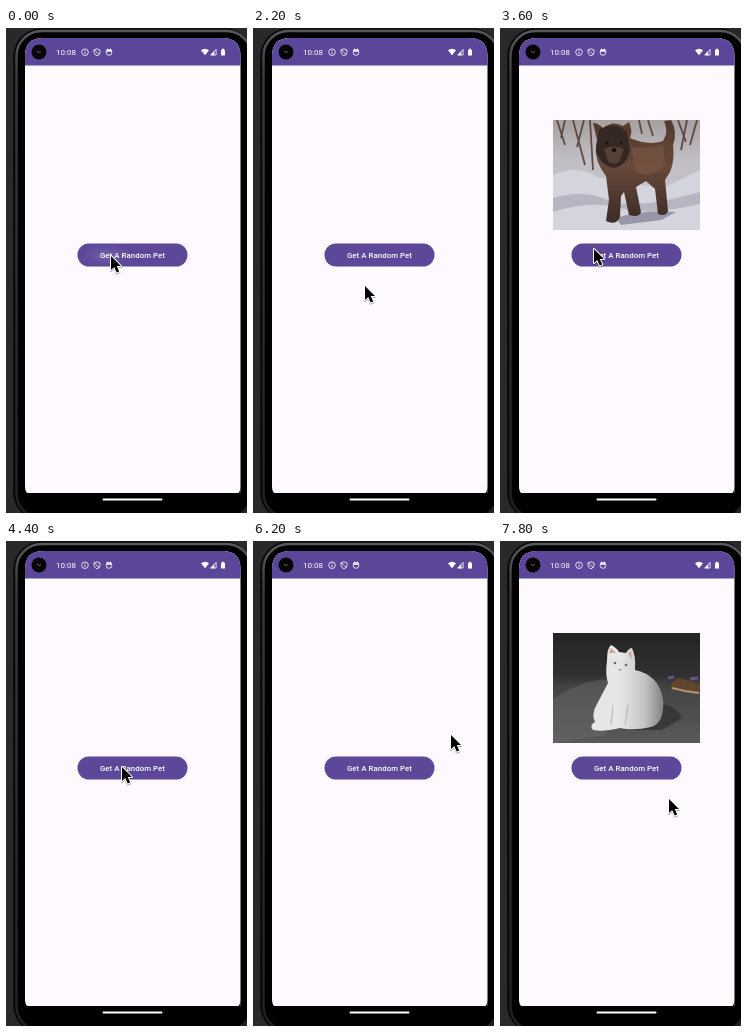
Recreate the animation shown at these times as an HTML page. Size 241x485 px, loop 8 s.

```html
<!DOCTYPE html>
<html lang="en">
<head>
<meta charset="utf-8">
<title>Random pet</title>
<style>
html, body { margin: 0; width: 100%; height: 100%; overflow: hidden; background: #29292b; }
svg { display: block; width: 100%; height: 100%; }
text { font: 500 7.8px Roboto, sans-serif; fill: #fff; }
.clock { font-weight: 400; font-size: 8px; }
.pet { visibility: hidden; }
</style>
</head>
<body>
<svg viewBox="0 0 241 485">
  <defs>
    <linearGradient id="rim" x2="0" y2="1">
      <stop stop-color="#59595b"/><stop offset=".1" stop-color="#38383a"/><stop offset="1" stop-color="#202022"/>
    </linearGradient>
    <linearGradient id="snow" x2="0" y2="1">
      <stop stop-color="#a7a0a0"/><stop offset=".35" stop-color="#c0bdc3"/><stop offset="1" stop-color="#c9c9d2"/>
    </linearGradient>
    <linearGradient id="hedge" x2="0" y2="1">
      <stop stop-color="#304019"/><stop offset=".4" stop-color="#1c2812"/><stop offset=".62" stop-color="#25351a"/><stop offset=".7" stop-color="#668039"/><stop offset=".85" stop-color="#42611f"/><stop offset="1" stop-color="#54752a"/>
    </linearGradient>
    <linearGradient id="violet" x2="0" y2="1">
      <stop stop-color="#51428a"/><stop offset=".6" stop-color="#6254a1"/><stop offset=".85" stop-color="#4a3d7b"/><stop offset="1" stop-color="#8c829c"/>
    </linearGradient>
    <linearGradient id="room" x2="0" y2="1">
      <stop stop-color="#242425"/><stop offset=".38" stop-color="#303031"/><stop offset=".5" stop-color="#444445"/><stop offset="1" stop-color="#59595a"/>
    </linearGradient>
    <linearGradient id="brindle" x2="0" y2="1">
      <stop stop-color="#513a2f"/><stop offset=".45" stop-color="#674839"/><stop offset="1" stop-color="#3d2b25"/>
    </linearGradient>
    <linearGradient id="white">
      <stop offset=".4" stop-color="#e6e6e7"/><stop offset=".75" stop-color="#c2c2c3"/><stop offset="1" stop-color="#818183"/>
    </linearGradient>
    <radialGradient id="ripple">
      <stop stop-color="#8473b8"/><stop offset="1" stop-color="#8473b8" stop-opacity="0"/>
    </radialGradient>
  </defs>

  <!-- phone body -->
  <rect x="7.500" y=".5" width="239" height="492" rx="28" fill="#050506" stroke="#101012"/>
  <rect x="10.500" y="3" width="235" height="487" rx="25" fill="#000" stroke="url(#rim)" stroke-width="2.500"/>
  <path d="M19 465V28q0-18 18-18H216.500q18 0 18 18V465Z" fill="#fdf9ff"/>
  <path d="M19 37.500V28q0-18 18-18H216.500q18 0 18 18V37.500Z" fill="#5c4699"/>
  <path d="M19 458q0 5 2 7h-2ZM234.500 458q0 5-2 7h2Z"/>
  <rect x="96.500" y="470.500" width="60" height="2" rx="1" fill="#fff"/>

  <!-- status bar -->
  <circle cx="33" cy="24" r="7.500" fill="#050505"/>
  <path d="M31 23l2 1.500 2-1" fill="none" stroke="#777" stroke-width=".8"/>
  <text class="clock" x="50" y="27">10:08</text>
  <g fill="none" stroke="#fff" stroke-width=".8">
    <circle cx="79" cy="24.200" r="3.300"/>
    <path d="M79 23.700v2.300M79 22v.9"/>
    <path d="M91 20.800l3 1.200v2.200q0 2.300-3 3.700q-3-1.400-3-3.700V22ZM88 21.500l5.600 5.600"/>
    <circle cx="103" cy="24.400" r="2.900"/>
    <path d="M100.300 23h5.400M101 20.800l1 1.200M105 20.800l-1 1.200" stroke-width="1.300"/>
    <path d="M204.800 27l5.300-5.600V27Z"/>
  </g>
  <path d="M195 22.300q4-3.200 8 0l-4 5Z M204.300 27.300l4-4v4Z M215 21.700h1v-.9h2v.9h1v5.800h-4Z" fill="#fff"/>

  <!-- pets -->
  <svg class="pet" x="53" y="92" width="147" height="110">
    <rect width="147" height="110" fill="url(#snow)"/>
    <path d="M0 55Q25 44 44 57L110 68 147 50V110H0Z" fill="#d4d4dc"/>
    <path d="M0 78q30-9 55 2t92-8v12q-50 12-80 4T0 92Z" fill="#b6b6c3"/>
    <path d="M4 0l8 25M12 0l-4 18M20 0l12 45M31 0l-7 27M37 0l3 50M86 0l3 14M95 0l5 16M125 0l8 22M134 0l-6 30M144 0l-7 25" fill="none" stroke="#5f4a42" stroke-width="1.800"/>
    <path d="M63 98Q90 89 123 92L108 100 68 105Z" fill="#9797a8"/>
    <path d="M44 20L40 3q5 0 10 5 10-8 20-2l6-4q4 9 1 16 18 8 33 3 6-9 1-20l7-1q7 12 2 25 2 15-3 27l-5 8 3 31q-2 6-10 3l-3-25-9-8-10 6 5 25q-2 6-12 3l-5-23-3 4-1 21q-4 9-14 4l3-21-3-24q-12-15-10-31Z" fill="url(#brindle)"/>
    <path d="M46 10q15-10 28 2l3 18q-4 17-17 18-13-3-17-18Z" fill="#352724"/>
    <path d="M51 29q10-5 20 0l-5 13q-6 4-11-1Z" fill="#574036"/>
    <path d="M78 27q16 2 32-3l2 22q-13 12-29 7Z" fill="#7c5944" opacity=".55"/>
    <circle cx="54" cy="23" r="1.300" fill="#111"/><circle cx="68" cy="23" r="1.300" fill="#111"/>
    <ellipse cx="61" cy="30" rx="2.500" ry="2" fill="#111"/>
  </svg>

  <svg class="pet" x="74" y="92" width="105" height="110">
    <rect width="105" height="110" fill="url(#hedge)"/>
    <path d="M0 49q10-5 18 4v20H0Z" fill="#775137"/>
    <path d="M96 32q5-7 9-5v42l-12 3Z" fill="#675639"/>
    <path d="M10 97q35-10 85 0l-20 6H25Z" fill="#294216" opacity=".75"/>
    <path d="M71 10q4-9 15-9 10 1 12 8v9l-8 3q1 15-1 31l-2 14 4 29q-4 6-9 2l-4-23 1 24q-2 5-10 2l4-7-4-29q-14 3-29 1l-7 17 3 22q-2 6-8 2l1-29-10 10-3 15q-5 4-9 0l5-18 5-14q-3-23 9-27 16-5 34-5 9-7 11-18Z" fill="#82635a"/>
    <path d="M73 9q5-7 13-7l-6 12-2 20q-18 9-48 8 18-6 35-8Z" fill="#a18477" opacity=".65"/>
    <path d="M73 9q4-7 7-3l1 12-6 3Z" fill="#46332e"/>
    <path d="M20 43q18 9 43 2l9 16q-25 2-40-2l-11 8Z" fill="#584039" opacity=".65"/>
    <circle cx="87" cy="7" r="1.200" fill="#181313"/><ellipse cx="96" cy="11" rx="2" ry="1.700" fill="#211817"/>
  </svg>

  <svg class="pet" x="64" y="92" width="125" height="110">
    <rect width="125" height="110" fill="url(#violet)"/>
    <path d="M0 95H125V110H0Z" fill="#9b91a5" opacity=".6"/>
    <path d="M18 94q13-9 37-6l39-4q15 0 12 10-10 8-31 5l-44 4Q12 103 18 94Z" fill="#776158"/>
    <path d="M67 27l2-11 8 5q7-3 13 0l8-4-2 14q2 12-8 18-4 15-9 23l11 10q4 8-5 9l-13-5-7 9q-10 6-29 4-22-1-24-20-1-20 18-34 15-8 30-10Z" fill="#d9d0ce"/>
    <path d="M18 64q8-17 27-23l18 1-11 13-20 7Z" fill="#b8a49d" opacity=".65"/>
    <path d="M67 28l3-10 8 6 6 6 7-7 6-4-2 13-8 1-4-4-6 6-9-1Z" fill="#84736e"/>
    <path d="M61 42l17 3-3 20-17 19-8-16Z" fill="#f0e9e7"/>
    <circle cx="77" cy="33" r="1.700" fill="#496c91"/><circle cx="89" cy="33" r="1.700" fill="#496c91"/>
    <path d="M82 38h4l-2 3Z" fill="#997373"/>
  </svg>

  <svg class="pet" x="53" y="92" width="147" height="110">
    <rect width="147" height="110" fill="url(#room)"/>
    <path d="M0 66Q35 43 60 47L53 102 0 110Z" fill="#6a6a6b" opacity=".45"/>
    <path d="M92 70q30-2 37 15l-20 12H78Z" fill="#29292a" opacity=".6"/>
    <path d="M118 51q7-9 15-4l14 4v10l-17-2-12-5Z" fill="#60442f"/>
    <path d="M119 55l13 3 14 2" fill="none" stroke="#ae976e" stroke-width="2"/>
    <path d="M115 45l6-1M137 46l8-1" stroke="#67557f" stroke-width="3"/>
    <path d="M54 28q0-13 4-16 6 3 8 7l7 1q3-5 6-5 4 8 3 22 24 5 28 29 2 24-12 28-17 4-31 1-15 4-27 2-4-5 2-8-4-8 2-18l11-21q-3-9-1-22Z" fill="url(#white)"/>
    <path d="M56 20l2-5 5 5ZM75 21l3-3 1 8Z" fill="#d4a795"/>
    <circle cx="62" cy="30" r="1.300" fill="#687065"/><circle cx="73" cy="32" r="1.300" fill="#687065"/>
    <path d="M65 36h4l-2 2Z" fill="#b98a86"/>
    <path d="M60 72l-2 20M75 72l-3 20" stroke="#a9a9aa" stroke-width=".8"/>
  </svg>

  <!-- button and pointer -->
  <rect x="71.500" y="215.500" width="110" height="23" rx="11.500" fill="#5d4799"/>
  <ellipse id="press" cx="101" cy="227" rx="25" ry="11" fill="url(#ripple)" opacity=".55"/>
  <text x="126.500" y="229.800" text-anchor="middle" letter-spacing=".07">Get A Random Pet</text>
  <path id="pointer" d="M0 0V14L3.200 11 5.700 16.600 8.200 15.500 5.700 10.100H10Z" stroke="#fff" stroke-width="2" stroke-linejoin="round" paint-order="stroke" style="filter:drop-shadow(0 1px .7px #0005)"/>
</svg>
<script>
const LOOP = 8000, STEP = 200;
const pets = document.querySelectorAll('.pet');
const pointer = document.getElementById('pointer');
const press = document.getElementById('press');

// [start, end] of each pet's visit
const visits = [[3200, 4400], [4800, 5600], [6800, 7200], [7400, 8000]];

// [time, x, y] of the pointer tip
const path = [
  [0, 105, 228], [600, 105, 227], [1200, 110, 225], [1600, 112, 211], [1800, 112, 211],
  [2200, 112, 258], [2600, 112, 258], [3000, 98, 227], [3400, 94, 221], [3600, 94, 221],
  [4000, 105, 279], [4200, 112, 237], [4400, 116, 226], [4800, 120, 211], [5000, 120, 210],
  [5400, 132, 225], [5800, 160, 223], [6200, 198, 194], [6400, 185, 211], [6600, 166, 225],
  [7200, 166, 225], [7600, 169, 258], [8000, 169, 258]
];

function pointAt(time) {
  const i = path.findIndex(p => p[0] > time);
  const [t0, x0, y0] = path[i - 1], [t1, x1, y1] = path[i];
  const u = (time - t0) / (t1 - t0), ease = u * u * (3 - 2 * u);
  return [x0 + (x1 - x0) * ease, y0 + (y1 - y0) * ease];
}

function draw(now) {
  const time = Math.floor(now % LOOP / STEP) * STEP;
  pets.forEach((pet, i) => {
    const [start, end] = visits[i];
    pet.style.visibility = time >= start && time < end ? 'visible' : 'hidden';
  });
  press.style.visibility = time < 400 ? 'visible' : 'hidden';
  pointer.setAttribute('transform', `translate(${pointAt(time)})`);
  requestAnimationFrame(draw);
}
draw(performance.now());
</script>
</body>
</html>
```
